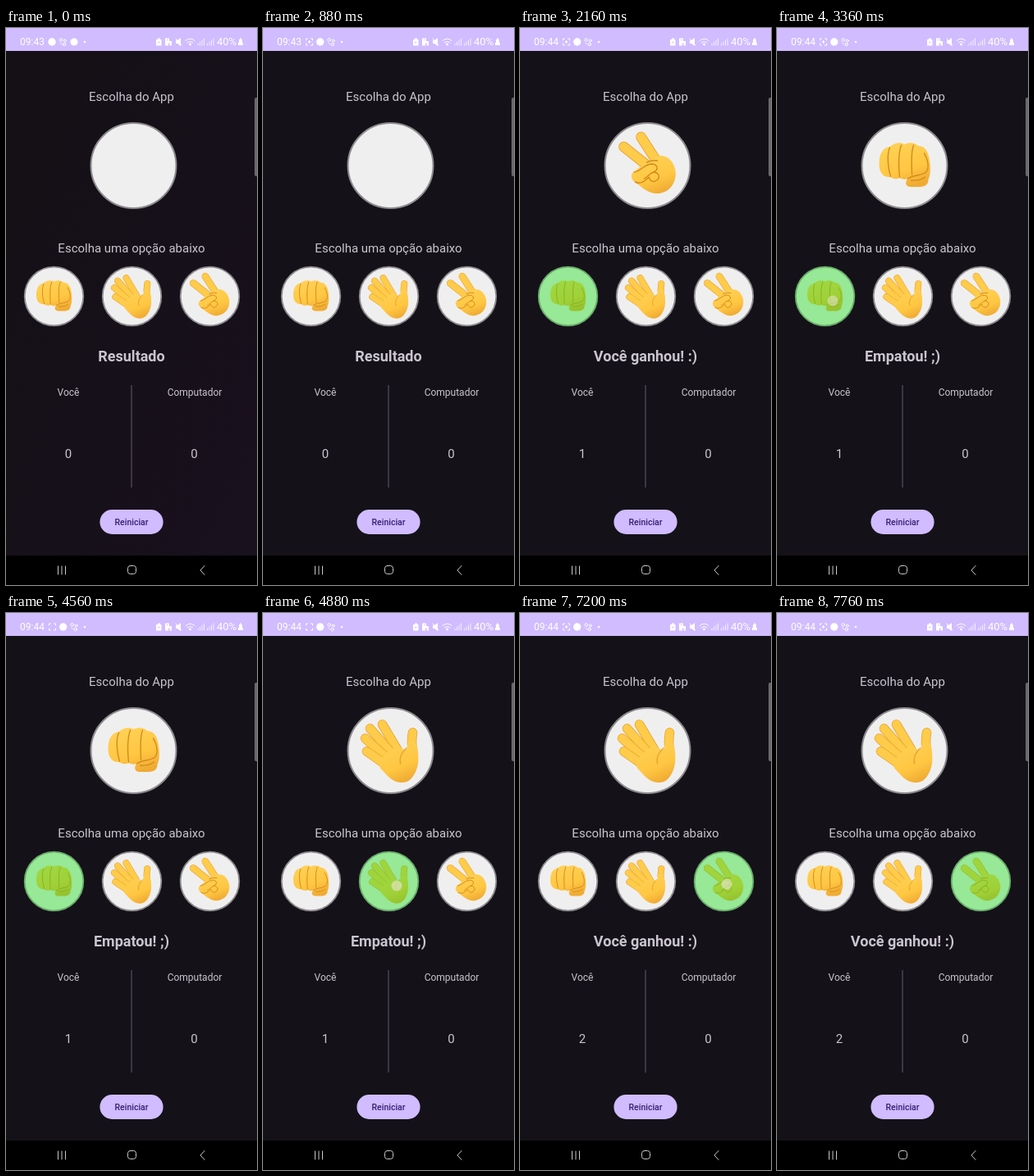
Animation of 306 by 680 pixels, one loop 8 s. Source, as an HTML page:

```html
<!DOCTYPE html>
<html lang="pt-BR">
<head>
<meta charset="utf-8">
<title>Pedra, papel e tesoura</title>
<style>
  html, body { margin: 0; width: 100%; height: 100%; overflow: hidden; background: #141218; }
  svg { display: block; width: 100%; height: 100%; }
  text { font-family: Roboto, sans-serif; fill: #cac5ce; }
  .mid { text-anchor: middle; }
  .skin { fill: url(#skin); }
  .crease { fill: none; stroke: #d58a1c; stroke-width: 1.4; stroke-linecap: round; stroke-linejoin: round; }
  .edge { fill: none; stroke: #e5a02c; stroke-linecap: round; }
  .finger { fill: none; stroke: #ffcb4a; stroke-linecap: round; }
  .rim { fill: #f0eff0; stroke: #8d8b8e; filter: blur(.45px); }
  .white { fill: #fff; }
  .line { fill: none; stroke: #fff; stroke-width: 1; stroke-linecap: round; stroke-linejoin: round; }
</style>
</head>
<body>
<svg viewBox="0 0 306 680">
  <defs>
    <linearGradient id="skin" x1=".2" y1="0" x2=".6" y2="1">
      <stop offset="0" stop-color="#ffd257"/><stop offset=".65" stop-color="#ffc642"/><stop offset="1" stop-color="#efab33"/>
    </linearGradient>
    <linearGradient id="dusk" x2="1" y2="1">
      <stop offset=".2" stop-color="#141016"/><stop offset="1" stop-color="#19111f"/>
    </linearGradient>
    <g id="fist">
      <path class="skin" d="M-31-2C-31-14-27-22-18-23C-13-28-5-29 0-26C6-29 13-28 17-24C26-24 30-15 31-3C32 6 31 13 29 17C29 24 24 26 17 26H8C1 26 0 20 4 16Q-1 18-6 15Q-12 18-17 14C-26 15-31 8-31-2Z"/>
      <path class="crease" d="M-18-22C-22-13-20 4-17 13M-4-25C-8-14-7 4-6 14M11-25C7-15 9 2 9 11M4 16C10 11 20 13 26 8C31 3 28-9 24-15M8 18Q18 19 25 14"/>
    </g>
    <g id="hand">
      <g id="digits"></g>
      <path class="skin" d="M-12 11L-4 2L8-7C13-4 17 2 20-4L23-12L32-8C34 2 35 14 32 22C28 34 21 40 12 39C1 38-5 29-13 21Z"/>
      <path class="crease" d="M19-3C14 2 10 8 12 16" opacity=".6"/>
    </g>
    <g id="scissors">
      <path class="edge" stroke-width="12.600" d="M1 1L-29-23M12-4L-8-35"/>
      <path class="finger" stroke-width="11" d="M1 1L-29-23M12-4L-8-35"/>
      <path class="skin" d="M-5-2L13-12C24-14 32-5 34 6C36 20 27 33 13 34C2 35-6 27-13 22C-21 18-22 9-15 6Z"/>
      <path class="crease" d="M-16 8C-9 7-4-1 4-2C13-2 14 5 7 8C2 10 0 14-4 16M-15 20C-7 24-2 17 2 14M7 8C14 8 16 15 11 18C7 21 3 19 2 15M-1-4Q6-7 12-6"/>
    </g>
  </defs>

  <rect width="306" height="680" fill="#141218"/>
  <rect id="tint" width="306" height="680" fill="url(#dusk)"/>
  <rect width="306" height="28" fill="#d0bcff"/>
  <rect y="644" width="306" height="36"/>
  <rect x="303" y="85" width="6" height="96" rx="2" fill="#69676c"/>

  <!-- status bar -->
  <text id="clock" class="white" x="17" y="21" font-size="12"></text>
  <g id="recorder">
    <path class="line" d="M-4-2V-4H-2M2-4H4V-2M4 2V4H2M-2 4H-4V2"/>
    <path id="blink" class="line" d="M-1.6 0H1.6M0-1.6V1.6"/>
  </g>
  <g id="notices">
    <circle class="white" cx="56" cy="17" r="4.7"/>
    <g class="line"><circle cx="67" cy="14.500" r="1.800"/><circle cx="72" cy="15.500" r="1.500"/><circle cx="71" cy="20" r="1.700"/><path d="M66 18L68 20"/></g>
  </g>
  <circle id="disc" class="white" cx="83" cy="17" r="4.600"/>
  <circle class="white" cx="96" cy="17" r="1.300"/>
  <path class="white" d="M183 14H185V12.500H188V14H189.500V21.500H183ZM194 21.500V12.500H199V16H202V21.500H199.500V18.500H198V21.500ZM207 15H209L213 12V22L209 19H207Z"/>
  <path d="M185 17.500H187.500M196 14.500H197.500" stroke="#d0bcff"/>
  <path class="line" d="M207 13L214 21M219 15.500Q224.500 10.500 230 15.500M221 18Q224.500 15 228 18"/>
  <circle class="white" cx="224.500" cy="20" r="1.400"/>
  <path class="line" d="M234 21V19M236.500 21V17M239 21V15M241.500 21V13M245.500 21V19M248 21V17M250.500 21V15M253 21V13" opacity=".75"/>
  <text class="white" x="257" y="21" font-size="13">40%</text>
  <path class="white" d="M284 14H285V12.500H287V14H288V18H289V21H283V18H284Z"/>

  <!-- screen -->
  <g class="mid">
    <text x="153" y="88.500" font-size="15">Escolha do App</text>
    <text x="153" y="274" font-size="15">Escolha uma opção abaixo</text>
    <text id="result" x="153" y="407" font-size="18" font-weight="700"></text>
    <text x="76" y="449" font-size="12">Você</text>
    <text x="230" y="449" font-size="12">Computador</text>
    <text id="score" x="76" y="524.500" font-size="15"></text>
    <text x="229.500" y="524.500" font-size="15">0</text>
  </g>
  <path d="M153 436V561" stroke="#49454f" stroke-width="1.500"/>
  <rect x="114.400" y="588" width="77.200" height="30" rx="15" fill="#d0bcff"/>
  <text class="mid" x="153" y="606.700" font-size="10.500" font-weight="500" style="fill:#381e72">Reiniciar</text>
  <g transform="translate(155.500 168)">
    <circle class="rim" r="52" stroke-width="2"/>
    <use id="appHand"/>
  </g>
  <g id="options"></g>
  <circle id="touch" r="6.500" fill="#eee6d8"/>

  <!-- navigation bar -->
  <g class="line" opacity=".8">
    <path d="M63.500 657V667M68 657V667M72.500 657V667M242 656.500L237 662L242 667.500"/>
    <rect x="148.500" y="656.500" width="10" height="10" rx="3"/>
  </g>
</svg>
<script>
const LOOP = 8000;
const $ = id => document.getElementById(id);
const clamp = v => Math.min(1, Math.max(0, v));

const rounds = [
  { at: 0, app: '', pick: '', text: 'Resultado', score: 0 },
  { at: 1200, app: 'scissors', pick: 'fist', text: 'Você ganhou! :)', score: 1 },
  { at: 3280, app: 'fist', pick: 'fist', text: 'Empatou! ;)', score: 1 },
  { at: 4880, app: 'hand', pick: 'hand', text: 'Empatou! ;)', score: 1 },
  { at: 7200, app: 'hand', pick: 'scissors', text: 'Você ganhou! :)', score: 2 }
];
const taps = [
  { from: 1120, to: 1520, x: 62, y: 331 },
  { from: 3280, to: 3520, x: 68, y: 333 },
  { from: 4880, to: 5120, x: 163, y: 333 },
  { from: 7120, to: 7520, x: 252, y: 331 }
];
const blinkOff = [[400, 880], [1520, 1760], [2560, 2800], [3520, 3760], [4560, 4960], [5600, 5840], [6400, 6800], [7440, 7760]];

const digits = ['M9 0L-10-32', 'M2 4L-25-27', 'M-3 10L-31-15', 'M-6 17L-29 1', 'M27 0Q25-10 27-22'];
$('digits').innerHTML = digits.map(d =>
  `<path class="edge" stroke-width="11.600" d="${d}"/><path class="finger" stroke-width="10.200" d="${d}"/>`).join('');

const optionX = { fist: 58.5, hand: 153.5, scissors: 248.5 };
$('options').innerHTML = Object.entries(optionX).map(([name, x]) => `
  <g transform="translate(${x} 327.500) scale(.695)">
    <circle class="rim" r="51.500" stroke-width="2.600"/>
    <use href="#${name}"/>
    <circle id="${name}Mark" r="52.500" fill="#2cde2c" opacity="0"/>
  </g>`).join('');

function draw(t) {
  const round = rounds.findLast(r => t >= r.at);
  $('appHand').setAttribute('href', '#' + round.app);
  $('result').textContent = round.text;
  $('score').textContent = round.score;
  for (const name in optionX) $(name + 'Mark').setAttribute('opacity', name === round.pick ? .45 : 0);

  const arrive = clamp((t - 80) / 320);
  $('tint').setAttribute('opacity', 1 - arrive);
  $('notices').setAttribute('transform', `translate(${13.7 * arrive} 0)`);
  $('recorder').setAttribute('transform', `translate(56.500 17) scale(${arrive})`);
  $('disc').setAttribute('opacity', 1 - arrive);
  $('blink').setAttribute('opacity', blinkOff.some(([a, b]) => t >= a && t < b) ? 0 : 1);
  $('clock').textContent = t < 1360 ? '09:43' : '09:44';

  const tap = taps.find(p => t >= p.from && t < p.to);
  $('touch').setAttribute('opacity', tap ? .6 * clamp(1.3 * (tap.to - t) / (tap.to - tap.from)) : 0);
  if (tap) {
    $('touch').setAttribute('cx', tap.x);
    $('touch').setAttribute('cy', tap.y);
  }
}

const start = performance.now();
function tick() {
  draw((performance.now() - start) % LOOP);
  requestAnimationFrame(tick);
}
tick();
</script>
</body>
</html>
```
